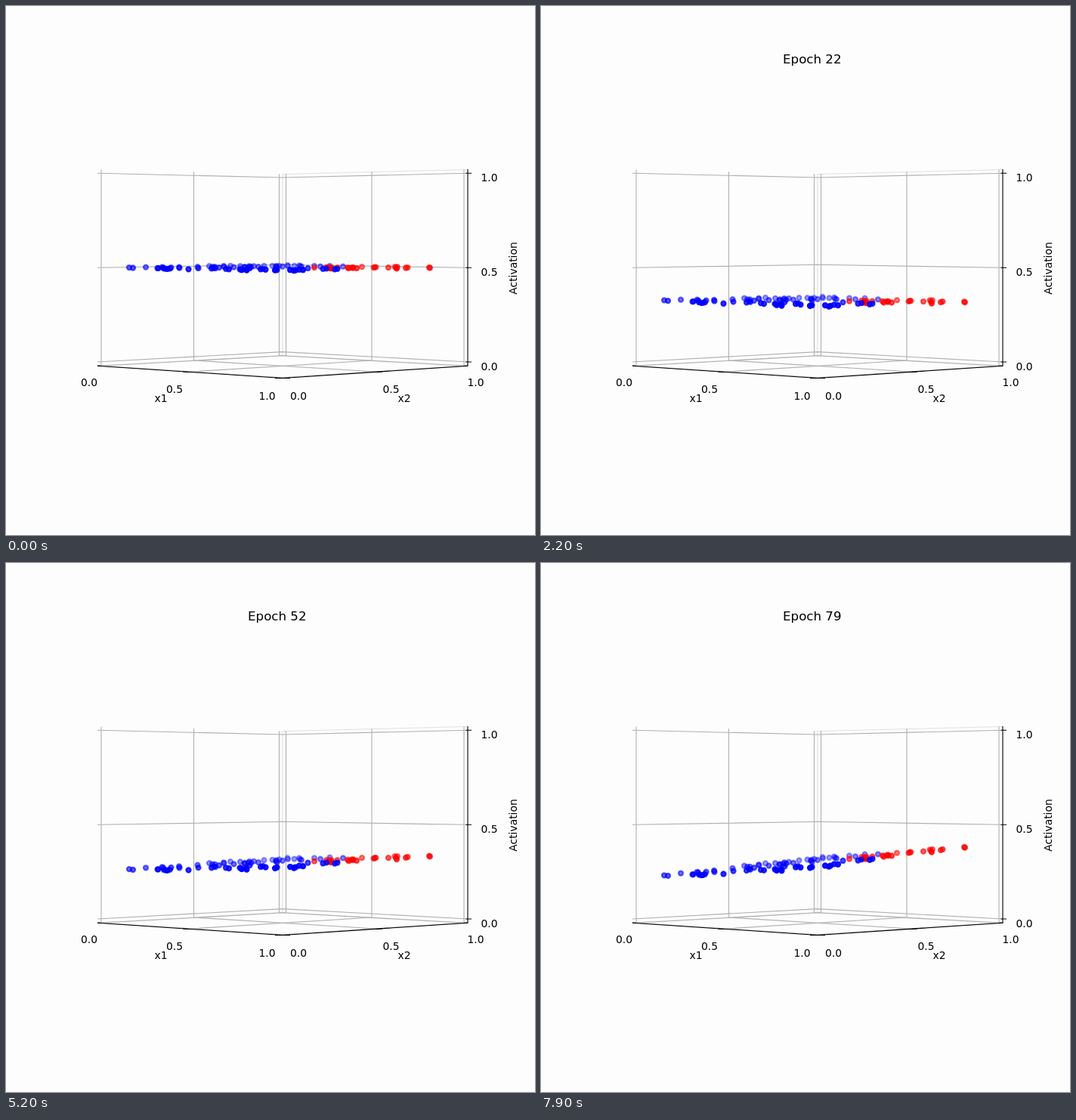
An HTML page for the animation above (8 s loop, 700 px wide and 700 px high).

```html
<!DOCTYPE html>
<html lang="en">
<head>
<meta charset="utf-8">
<title>Activation by epoch</title>
<style>
  html, body { margin: 0; width: 100%; height: 100%; overflow: hidden; background: #fdfdfd; }
  svg { display: block; width: 100vw; height: 100vh; }
  text { font: 13.89px "DejaVu Sans", sans-serif; text-anchor: middle; }
  #title { font-size: 16.67px; }
  path { fill: none; stroke-width: 1.11; }
  circle { stroke-width: 2.08; }
</style>
</head>
<body>
<svg id="stage" viewBox="0 0 700 700"></svg>
<script>
const stage = document.getElementById("stage");
const FRAME_MS = 100, FRAMES = 80;

function add(tag, attrs, text = "") {
  const node = document.createElementNS("http://www.w3.org/2000/svg", tag);
  for (const key in attrs) node.setAttribute(key, attrs[key]);
  node.textContent = text;
  return stage.appendChild(node);
}
const line = (d, stroke) => add("path", { d, stroke });
const label = (x, y, text) => add("text", { x, y }, text);

// Box: pane edges, grid, axes and ticks
line("M366 222.5L611 216.5M366 222V462.5M121 476L366 462.5L611 476", "#e0e0e0");
line("M126 476.3L370.5 462.5V222.3M238.5 484.3L484 469V219.3M361 492L606 476.3V216.5", "#b0b0b0");
line("M606 476.3L361.5 462.5V222.3M494 484.3L248.5 469V219.3M370.5 492L126 476.3V216.5", "#b0b0b0");
line("M121 221.3L366 227L611 221.3M121 346.3L366 342.3L611 346.3M121 471L366 457.6L611 471", "#b0b0b0");
line("M121 476.2L366 492.5L611 476.2V216", "#000");
line("M608.5 221.3h7.5M608.5 346.3h7.5M608.5 471h7.5", "#000");
line("M121 476l5 .4M234 484l8 .5M356 492.4l10 .1M376 492.4l-10 .1M498 484l-8 .5M611 476l-5 .4", "#000");

["1.0", "0.5", "0.0"].forEach((text, i) => label(639.5, 232 + 125 * i, text));
label(110, 503, "0.0");
label(223, 512, "0.5");
label(345.5, 521, "1.0");
label(387, 521, "0.0");
label(509.5, 512, "0.5");
label(621.5, 503, "1.0");
label(205, 524, "x1");
label(527, 524, "x2");
add("text", { transform: "translate(676 347) rotate(-90)" }, "Activation");
const title = add("text", { id: "title", x: 358.8, y: 76 });

// Screen x of the samples in depth layers, from the back (-0.8) to the front (0.8)
const BLUE = [
  [372.5],
  [388],
  [297, 341.5, 352.5, 361.5, 373, 381.5, 408, 428.5],
  [269, 288, 310, 322, 328, 358, 389],
  [288.5, 357, 366, 391, 416, 446],
  [253.5, 273, 276.5, 316, 321, 324.5, 334],
  [185, 206.5, 229, 301.5, 315.5, 358.5],
  [163, 208, 218.5, 282],
  [168, 229.5, 275],
  [200.5, 201.5, 254.5, 277, 322.5, 399.5],
  [209, 217, 272, 424],
  [212, 214, 291, 340, 419.5, 438.5],
  [241.5, 295, 309.5, 337, 435],
  [311, 318, 343.5, 388],
  [312, 358.5, 376, 393],
  [318.5, 356, 383],
  [381]
];
const RED = [
  [], [], [], [], [],
  [471, 514.5, 518],
  [424, 428, 488, 489.5],
  [408, 431, 438.5, 452, 457.5, 459.5, 486.5, 506, 516, 531.5, 560],
  [459, 529, 561],
  [427, 453.5, 464],
  [430.5, 517]
];

const dots = [];
function addLayer(xs, depth, color) {
  const alpha = 0.3 + 0.7 * (depth + 0.8) / 1.6;
  for (const x of xs) {
    const node = add("circle", {
      cx: x, r: 3.1, fill: color, stroke: color,
      "fill-opacity": alpha, "stroke-opacity": alpha
    });
    dots.push({ node, x, depth });
  }
}
BLUE.forEach((xs, i) => {
  const depth = (i - 8) / 10;
  addLayer(RED[i] || [], depth, "#f00");
  addLayer(xs, depth, "#00f");
});

// Trained weights by epoch: [epoch, bias, slope]
const WEIGHTS = [
  [0, 0, 0], [5, -0.292, -0.041], [9, -0.466, -0.053], [14, -0.61, -0.043],
  [18, -0.688, -0.032], [30, -0.822, 0.019], [43, -0.861, 0.106],
  [60, -0.858, 0.2285], [79, -0.845, 0.364]
];

// Cubic Hermite interpolation through the weight keys
function weight(epoch, k) {
  const last = WEIGHTS.length - 1;
  let i = 0;
  while (i < last - 1 && epoch > WEIGHTS[i + 1][0]) i++;
  const secant = j => (WEIGHTS[j + 1][k] - WEIGHTS[j][k]) / (WEIGHTS[j + 1][0] - WEIGHTS[j][0]);
  const tangent = j => {
    if (j === 0) return secant(0) * 1.2;
    if (j === last) return secant(last - 1);
    const before = WEIGHTS[j][0] - WEIGHTS[j - 1][0], after = WEIGHTS[j + 1][0] - WEIGHTS[j][0];
    return (secant(j - 1) * after + secant(j) * before) / (before + after);
  };
  const span = WEIGHTS[i + 1][0] - WEIGHTS[i][0];
  const t = (epoch - WEIGHTS[i][0]) / span, s = 1 - t;
  return WEIGHTS[i][k] * (1 + 2 * t) * s * s + WEIGHTS[i + 1][k] * t * t * (3 - 2 * t)
    + span * t * s * (tangent(i) * s - tangent(i + 1) * t);
}

function draw(epoch) {
  const bias = weight(epoch, 1), slope = weight(epoch, 2);
  title.textContent = epoch ? "Epoch " + epoch : "";
  for (const { node, x, depth } of dots) {
    const activation = 1 / (1 + Math.exp(-bias - slope * (x - 366) / 200));
    const y = 346.5 + 4.5 * depth + (0.5 - activation) * (250 + 20 * depth);
    node.setAttribute("cy", y.toFixed(2));
  }
}

const start = performance.now();
function tick() {
  draw(Math.floor((performance.now() - start) / FRAME_MS) % FRAMES);
  requestAnimationFrame(tick);
}
tick();
</script>
</body>
</html>
```
